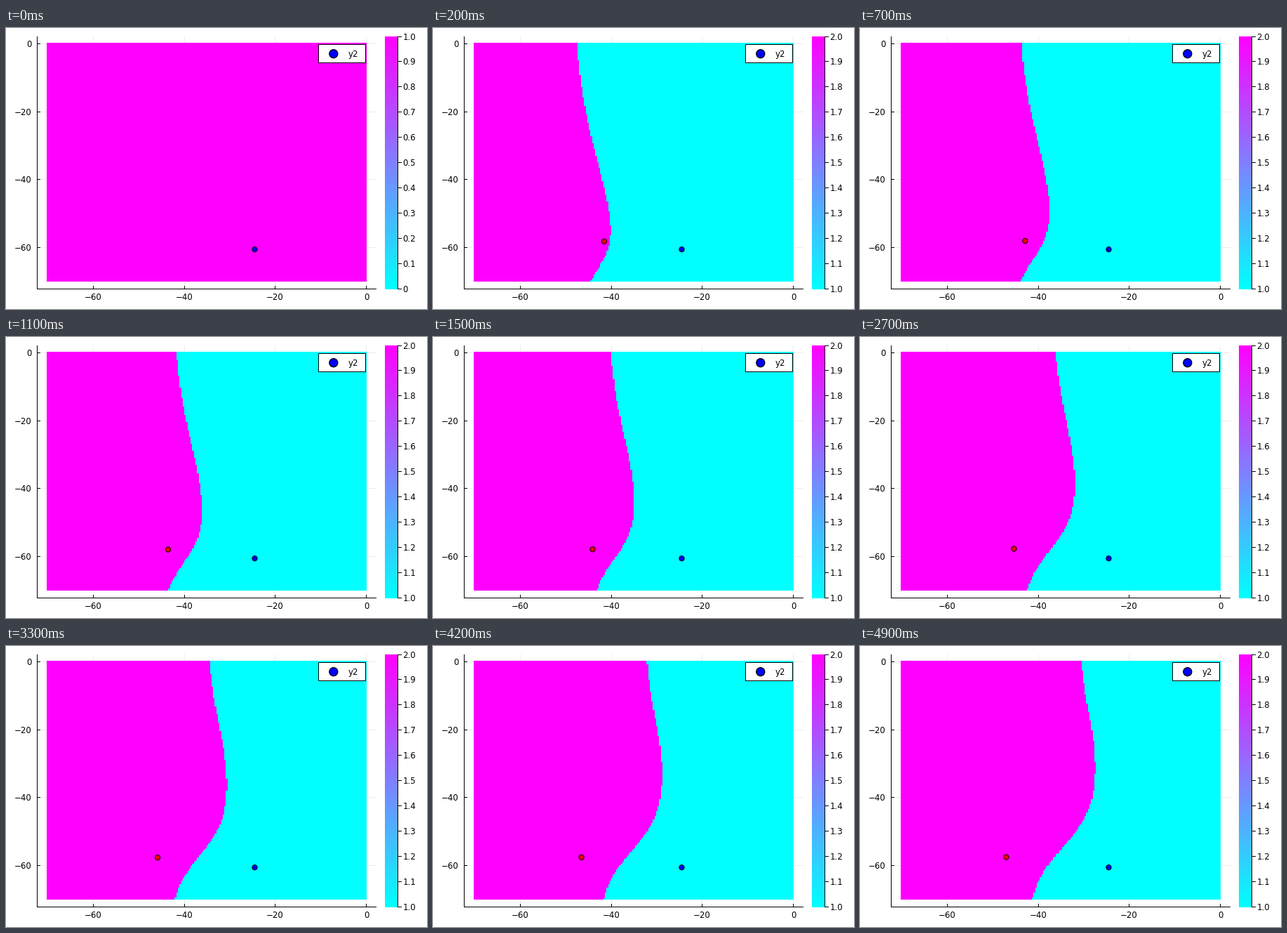
A matplotlib script for the animation above (5000 ms loop, 600 by 400 pixels).

```python
import numpy as np
import matplotlib.pyplot as plt
from matplotlib.animation import FuncAnimation
from matplotlib.colors import ListedColormap
from matplotlib.patches import Circle, Rectangle

W, H, DPI = 600, 400, 100
FRAMES, INTERVAL = 50, 100
PX = 72 / DPI  # one pixel in points
N = 200
LEFT, RIGHT, TOP, BOTTOM = 58, 514, 21, 361

plt.rcParams["font.family"] = "DejaVu Sans"
plt.rcParams["font.size"] = 8.5

rows = TOP + (np.arange(N) + 0.5) * (BOTTOM - TOP) / N
cols = LEFT + (np.arange(N) + 0.5) * (RIGHT - LEFT) / N


def sigmoid(y, mid, width):
    return 1 / (1 + np.exp((mid - y) / width))


def boundary(step):
    """Basin edge: a gentle rise to a bulge, then a steeper drop."""
    s = np.sqrt(step)
    p = (s - np.sqrt(6)) / (np.sqrt(48) - np.sqrt(6))

    def drift(a, b):
        return a * (b / a) ** p

    base = 182 + 17 * s + 0.27 * step
    rise = drift(58, 27) * sigmoid(rows, drift(165, 95), drift(60, 35))
    drop = (60 + 0.87 * step) * sigmoid(rows, drift(329, 287), drift(23, 29))
    return base + rise - drop


def basins(step):
    if step == 0:
        return np.ones((N, N))
    return (cols[None, :] < boundary(step)[:, None]).astype(float)


fig = plt.figure(figsize=(W / DPI, H / DPI), dpi=DPI, facecolor="white")
ax = fig.add_axes([0, 0, 1, 1])
ax.axis("off")


def mid_pixel(v):
    return np.floor(v) + 0.5


def line(x0, y0, x1, y1, **style):
    ax.plot([x0, x1], [y0, y1], **{"color": "black", "lw": PX, "zorder": 4,
                                   "solid_capstyle": "butt", "snap": False,
                                   **style})


def label(x, y, text, ha):
    return ax.text(x, y + 4.2, text, ha=ha, va="baseline", zorder=6)


def dot(x, y, r, color, lw=1.0, zorder=5):
    return ax.add_patch(Circle((x, y), r, fc=color, ec="black", lw=lw * PX,
                               zorder=zorder))


cool = ListedColormap([(v, 1 - v, 1) for v in np.linspace(0, 1, 256)])
image_style = dict(cmap=cool, vmin=0, vmax=1, aspect="auto",
                   interpolation="nearest", zorder=2)
heat = ax.imshow(basins(0), extent=(LEFT, RIGHT, BOTTOM, TOP), **image_style)
ax.imshow(np.linspace(1, 0, 256)[:, None], extent=(540, 558, 372, 12),
          **image_style)

# Axes, ticks and grid
grid = dict(alpha=0.1, lw=0.5, zorder=1)
line(44.5, 12, 44.5, 372)
line(44, 371.5, 528, 371.5)
for v in (0, -20, -40, -60):
    text = str(v).replace("-", "\u2212")
    y = mid_pixel(22.5 - 4.83 * v)
    line(45, y, 528, y, **grid)
    line(45, y, 49, y)
    label(36.7, y, text, "right")
    x = mid_pixel(513.5 + 6.487 * v)
    line(x, 12, x, 371, **grid)
    line(x, 367, x, 371)
    label(x, 383.2, text, "center")

# Colour bar scale
line(558.5, 12, 558.5, 372)
bar_labels = []
for i in range(11):
    y = mid_pixel(371.5 - 35.95 * i)
    line(558, y, 564, y)
    bar_labels.append(label(565.4, y, "", "left"))

# Legend
ax.add_patch(Rectangle((445.5, 23.5), 67, 26, fc="white", ec="black",
                       lw=PX, zorder=5, snap=False))
dot(466.8, 36.7, 6, "blue", 1.3, zorder=6)
label(488, 37, "y2", "left")

dot(354.5, 315.2, 3.6, "blue")
red = dot(0, 0, 3.6, "red")

ax.set_xlim(0, W)
ax.set_ylim(H, 0)


def update(i):
    # Past the fold the fixed point moves with the root of the parameter.
    step = max(0, i - 1)
    s = np.sqrt(step)
    heat.set_data(basins(step))
    red.set_visible(step > 0)
    red.center = (250 - 6 * s, 304.3 - 0.55 * s)
    low = 1 if step else 0
    for j, t in enumerate(bar_labels):
        value = low + j / 10
        t.set_text(f"{value:.1f}" if value else "0")
    return [heat, red, *bar_labels]


anim = FuncAnimation(fig, update, frames=FRAMES, interval=INTERVAL,
                     repeat=True, repeat_delay=0, blit=False)
plt.show()
```
